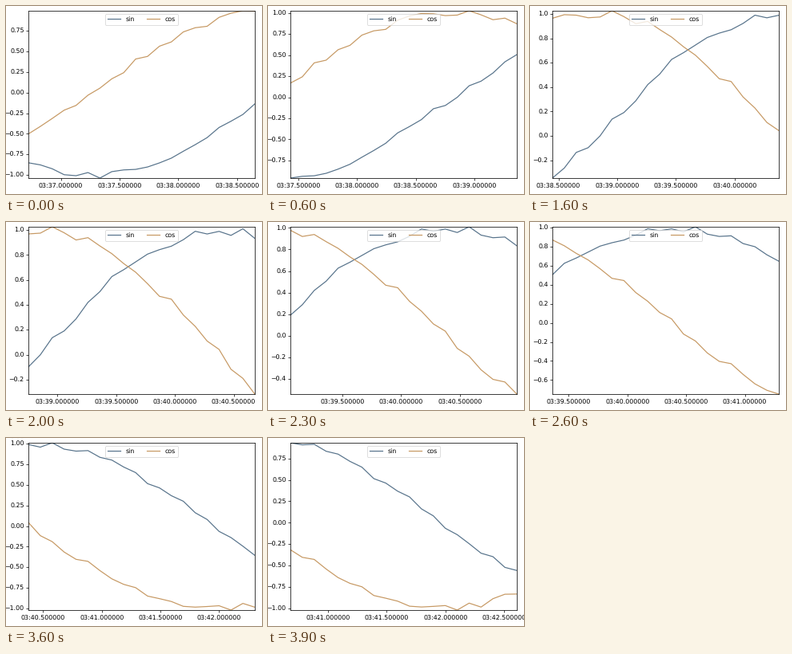
These frames come from a looping animation (320 px wide and 236 px high, 4 s). A matplotlib script:

```python
import numpy as np
import matplotlib.pyplot as plt
from matplotlib.animation import FuncAnimation
from matplotlib.ticker import FuncFormatter, MultipleLocator

W, H, DPI = 320, 236, 80
PX = 72 / DPI          # points per pixel
LEFT, RIGHT, TOP, BOTTOM = 28, 311, 6, 216
FRAMES, WINDOW = 40, 20
COUNT = FRAMES + WINDOW - 1
T0, DT = 36.724, 0.10144   # seconds after 03:00
RISE = 37.257              # moment when cos crosses zero upwards
NOISE = 0.04

# Both waves advance one radian per second, with jitter on each reading
rng = np.random.default_rng(7)
TIME = T0 + DT * np.arange(COUNT)
SIN = -np.cos(TIME - RISE) + rng.uniform(-NOISE, NOISE, COUNT)
COS = np.sin(TIME - RISE) + rng.uniform(-NOISE, NOISE, COUNT)

plt.rcParams.update({
    "font.family": "DejaVu Sans",
    "font.size": 7.95 * PX,
    "axes.linewidth": 0.75 * PX,
    "lines.linewidth": 1.2 * PX,
    "patch.linewidth": 0.8 * PX,
    "text.hinting": "none",
})


def clock(sec, _):
    whole, micro = divmod(round(sec * 1e6), 1_000_000)
    return f"03:{whole:02d}.{micro:06d}"


def y_label(step):
    digits = 2 if step == 0.25 else 1
    return lambda v, _: f"{v + 0.0:.{digits}f}".replace("-", "\u2212")


def first_sample(frame):
    # one reading is skipped early on, and the feed stalls once later
    return frame + (frame >= 3) - (frame >= 17)


fig = plt.figure(figsize=(W / DPI, H / DPI), dpi=DPI, facecolor="white")
ax = fig.add_axes([LEFT / W, 1 - BOTTOM / H,
                   (RIGHT - LEFT) / W, (BOTTOM - TOP) / H])
sin_line, = ax.plot([], [], color="#56728a", label="sin")
cos_line, = ax.plot([], [], color="#c69862", label="cos")
ax.tick_params(length=2.75 * PX, width=0.7 * PX)
ax.tick_params(axis="x", pad=4.3 * PX)
ax.tick_params(axis="y", pad=2.5 * PX)
ax.xaxis.set_major_locator(MultipleLocator(0.5))
ax.xaxis.set_major_formatter(FuncFormatter(clock))
ax.legend(loc="upper center", ncol=2)


def draw(frame):
    start = first_sample(frame)
    part = slice(start, start + WINDOW)
    t, s, c = TIME[part], SIN[part], COS[part]
    sin_line.set_data(t, s)
    cos_line.set_data(t, c)
    low, high = min(s.min(), c.min()), max(s.max(), c.max())
    step = 0.25 if high - low > 1.8 else 0.2
    ax.set_xlim(t[0], t[-1])
    ax.set_ylim(low, high)
    ax.yaxis.set_major_locator(MultipleLocator(step))
    ax.yaxis.set_major_formatter(FuncFormatter(y_label(step)))
    return sin_line, cos_line


anim = FuncAnimation(fig, draw, frames=FRAMES, interval=100,
                     repeat=True, repeat_delay=0, blit=False)
plt.show()
```
